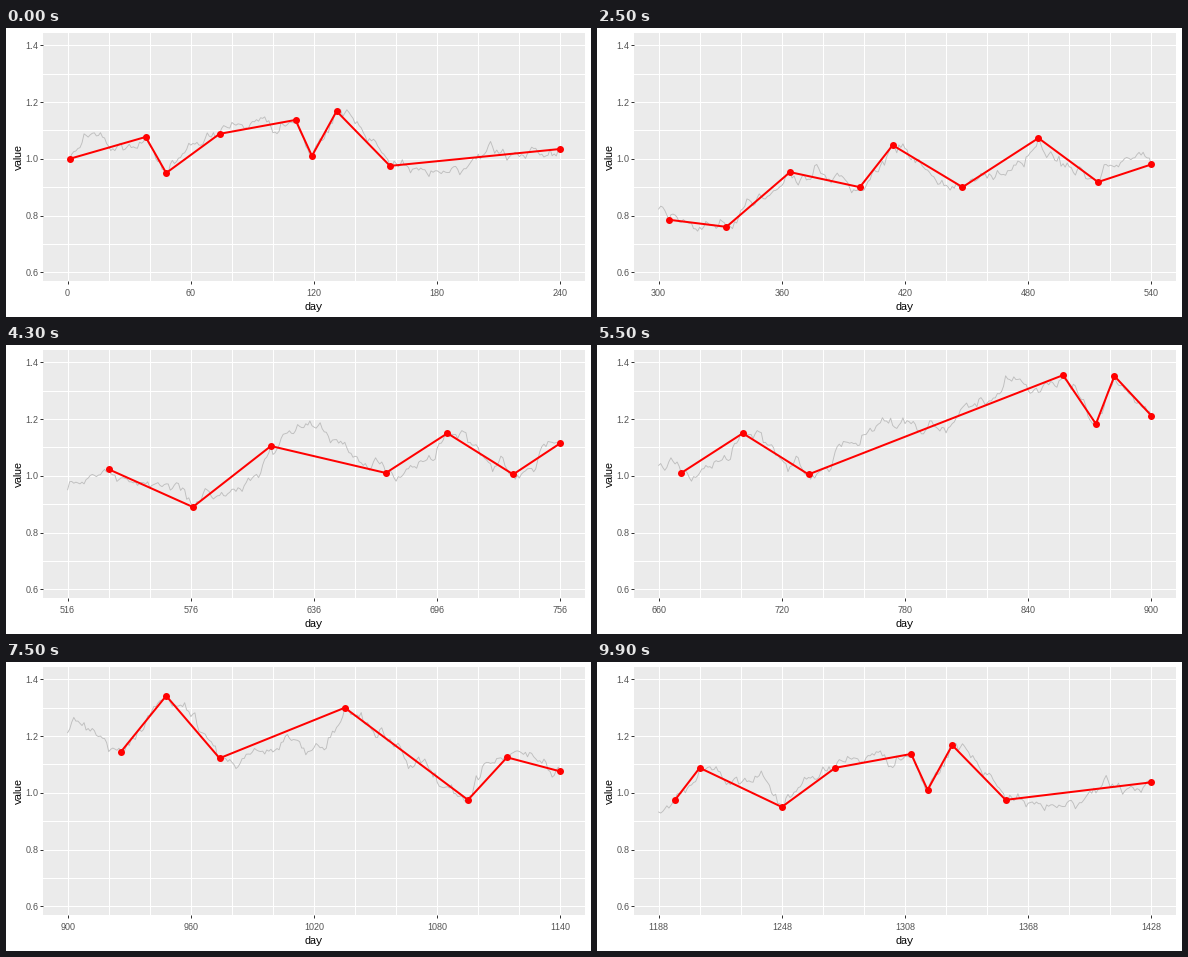
Animation, 585 px wide and 289 px high, one loop 10 s. Source, as a matplotlib script:

```python
import numpy as np
import matplotlib.pyplot as plt
from matplotlib.animation import FuncAnimation

W, H, DPI = 585, 289, 72          # at 72 dpi one point is one pixel
FRAMES, INTERVAL = 100, 100
STEP, SPAN, PERIOD = 12, 240, 1200
LAG = 15                          # days before a turning point is confirmed

plt.rcParams.update({
    "font.family": "Liberation Sans",
    "text.hinting": "native",
    "text.hinting_factor": 1,
})

# Turning points of the red line: (day, value)
TURNS = [
    (1, 1.0), (38, 1.077), (48, .95), (74, 1.088), (111, 1.137),
    (119, 1.01), (131, 1.168), (157, .975), (238, 1.01), (245, 1.148),
    (305, .785), (333, .76), (364, .953), (398, .90), (414, 1.048),
    (448, .90), (485, 1.073), (514, .918), (536, 1.023), (577, .89),
    (615, 1.105), (671, 1.01), (701, 1.15), (733, 1.005), (857, 1.355),
    (873, 1.183), (882, 1.352), (926, 1.145), (948, 1.342), (974, 1.122),
    (1035, 1.30), (1095, .975), (1114, 1.125), (1196, .975), (1208, 1.088),
]

# The few places where the grey series strays far from the red line
STRAYS = [(8, 1.088), (193, .965), (228, 1.037), (377, .98), (598, .945),
          (641, 1.155), (756, 1.115), (768, 1.187), (804, 1.19),
          (835, 1.34), (1017, 1.145), (1157, 1.11)]


def make_series():
    """One period of daily values: mean-reverting noise pinned to the key points."""
    keys = [p for p in TURNS if p[0] <= PERIOD] + STRAYS + [(PERIOD + 1, 1.0)]
    kx, ky = np.array(sorted(keys)).T
    days = np.arange(1, PERIOD + 2)
    noise = np.random.default_rng(7).normal(0, .012, days.size)
    for i in range(1, days.size):
        noise[i] += .86 * noise[i - 1]
    noise -= np.interp(days, kx, np.interp(kx, days, noise))
    return np.interp(days, kx, ky) + noise


series = make_series()
turns = np.array(TURNS + [(d + PERIOD, v) for d, v in TURNS if 48 <= d <= SPAN])


def value_at(day):
    return series[(day - 1) % PERIOD]


fig = plt.figure(figsize=(W / DPI, H / DPI), dpi=DPI, facecolor="white")
ax = fig.add_axes([37 / W, 1 - 253 / H, 542 / W, 248 / H], facecolor="#EBEBEB")
ax.spines[:].set_visible(False)
ax.set_axisbelow(True)
ax.set_ylim(.569, 1.4437)
levels = np.arange(.6, 1.5, .2)
ax.set_yticks(levels, [f"{v:.1f}" for v in levels])
ax.set_yticks(levels[:-1] + .1, minor=True)
ax.tick_params(which="major", length=2.75, width=1, color="#333333",
               labelcolor="#4D4D4D", labelsize=9.2)
ax.tick_params(which="minor", length=0)
ax.tick_params(axis="x", pad=5)
ax.tick_params(axis="y", pad=2)
ax.grid(which="both", color="white", lw=1)
fig.text(308 / W, 1 - 282 / H, "day", size=11, ha="center", va="baseline")
fig.text(12.8 / W, 1 - 129.4 / H, "value", size=11, rotation=90,
         ha="center", va="center")

grey, = ax.plot([], [], color="#BEBEBE", lw=.9)
red, = ax.plot([], [], color="#FF0000", lw=2, marker="o", ms=7, mew=0)


def update(i):
    start = i * STEP
    end = start + SPAN
    days = np.arange(max(start, 1), end + 1)
    grey.set_data(days, value_at(days))

    shown = turns[(turns[:, 0] >= start) & (turns[:, 0] <= end - LAG)]
    red.set_data(*np.vstack([shown, (end, value_at(end))]).T)

    ax.set_xlim(start - 12, end + 12)
    major = np.arange(start, end + 1, 60)
    ax.set_xticks(major, [str(d) for d in major])
    ax.set_xticks([d for d in range(start, end, 20) if d not in major], minor=True)
    return grey, red


anim = FuncAnimation(fig, update, frames=FRAMES, interval=INTERVAL,
                     repeat=True, repeat_delay=0, blit=False)
plt.show()
```
